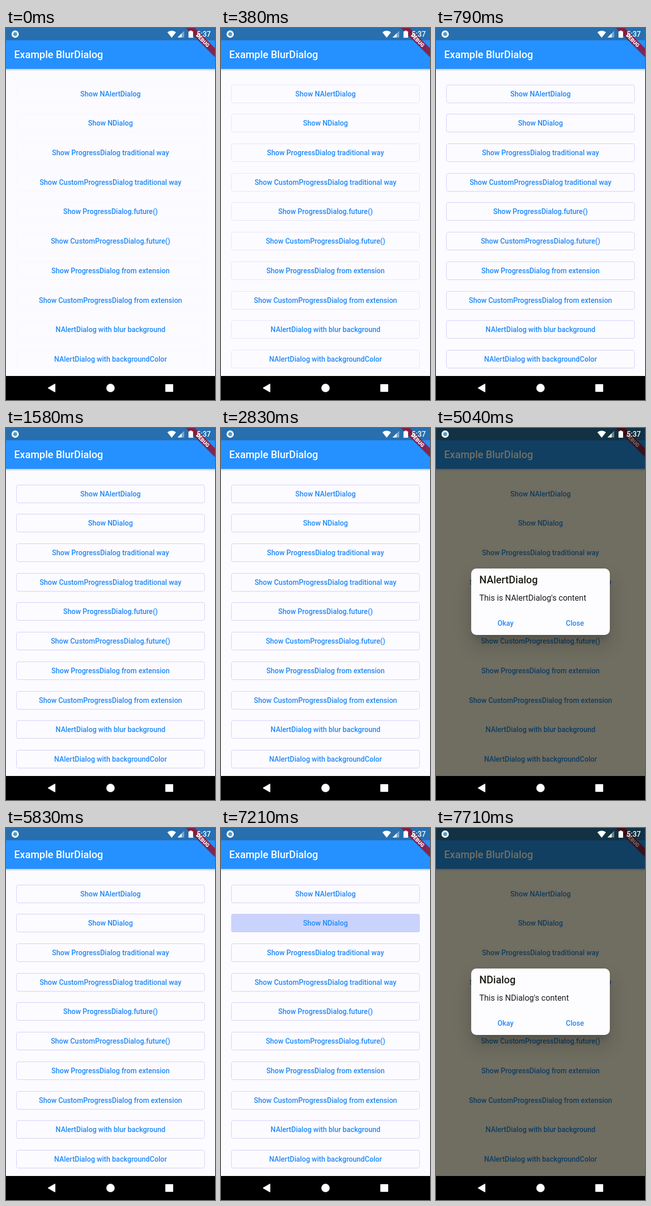
Write an HTML page that moves like this. It is 410 px wide and 728 px high and loops after 8 s.

```html
<!DOCTYPE html>
<html lang="en">
<head>
<meta charset="utf-8">
<title>Dialog demo</title>
<style>
  html, body { margin: 0; width: 100%; height: 100%; overflow: hidden; }
  body { background: #fcfbff; font-family: Roboto, "Liberation Sans", sans-serif; }
  #stage { position: relative; width: 410px; height: 728px; overflow: hidden; background: #fcfbff; isolation: isolate; }
  #stage > * { position: absolute; box-sizing: border-box; }
  .status { left: 0; top: 0; width: 410px; height: 24px; background: #276fae; }
  .appbar { left: 0; top: 24px; width: 410px; height: 56px; padding-left: 16px; background: #2590ff;
    color: #fff; font: 500 20px/57px Roboto, "Liberation Sans", sans-serif;
    box-shadow: 0 2px 3px rgba(60, 70, 120, .3); }
  .btn { left: 20px; width: 370px; height: 36px; border-radius: 4px; overflow: hidden;
    display: flex; align-items: center; justify-content: center;
    color: #2189f8; font-size: 14px; font-weight: 500; white-space: nowrap; }
  .btn * { position: absolute; box-sizing: border-box; }
  .btn span { position: relative; }
  .line { inset: 0; border: 1px solid #d3cdf9; border-radius: 4px; }
  .glow { inset: 0; background: #e0e5fe; opacity: 0; }
  .wave { left: -15px; top: -182px; width: 400px; height: 400px; border-radius: 50%; background: #c9d3fd; }
  .shade { left: 0; top: 0; width: 410px; height: 681px; background: #716f61; mix-blend-mode: multiply; opacity: 0; }
  .dialog { left: 69px; top: 275px; width: 272px; height: 130px; border-radius: 10px; background: #fdfcff; opacity: 0;
    box-shadow: 0 11px 15px -7px rgba(0, 0, 0, .2), 0 20px 34px 3px rgba(0, 0, 0, .14); }
  .dialog * { position: absolute; white-space: nowrap; margin: 0; }
  .dialog h2 { left: 16px; top: 10px; font: 500 20px/24px Roboto, "Liberation Sans", sans-serif; color: #1d1c14; }
  .dialog p { left: 16px; top: 48px; font-size: 16px; line-height: 20px; color: #1d1c1c; }
  .dialog b { top: 97px; width: 135px; text-align: center; font-size: 14px; line-height: 20px; font-weight: 500; color: #2189f8; }
  svg { left: 0; top: 0; }
  svg text { font-family: Roboto, "Liberation Sans", sans-serif; fill: #fff; }
</style>
</head>
<body>
<div id="stage">
  <div class="status"></div>
  <div class="appbar">Example BlurDialog</div>
  <svg id="banner" width="410" height="80">
    <g transform="translate(410 0) rotate(45)">
      <rect x="-40" y="28" width="80" height="12" fill="#000" opacity=".2" transform="translate(0 1)"/>
      <rect x="-40" y="28" width="80" height="12" fill="#a01030" opacity=".78"/>
      <text x="0" y="37.6" font-size="10.2" font-weight="900" text-anchor="middle">DEBUG</text>
    </g>
  </svg>
  <div class="shade"></div>
  <svg id="system" width="410" height="728" fill="#fff">
    <circle cx="18" cy="12" r="7.2" fill="#f4f9fc"/>
    <circle cx="18" cy="12" r="4" fill="#6ba9cb"/>
    <circle cx="18" cy="12" r="2" fill="#4b92bd"/>
    <path d="M316.500 8.300Q325 2 333.500 8.300L325 19Z"/>
    <path d="M336.500 18.500L349.500 5.500V18.500Z" opacity=".4"/>
    <path d="M336.500 18.500L344.500 10.500V18.500Z"/>
    <path d="M358 6.500h2.700V5h3.600v1.500H367V19h-9Z"/>
    <text x="374" y="17.200" font-size="14" font-weight="500">5:37</text>
    <rect y="681" width="410" height="47" fill="#000"/>
    <path d="M83 704.500L96 697V712Z" stroke="#fff" stroke-width="1.500" stroke-linejoin="round"/>
    <circle cx="205" cy="704.500" r="8.200"/>
    <rect x="312.500" y="697" width="15.500" height="15" rx="1"/>
  </svg>
</div>
<script>
  const LOOP = 8000;
  const stage = document.getElementById('stage');
  const banner = document.getElementById('banner');
  const system = document.getElementById('system');
  const shade = stage.querySelector('.shade');

  const labels = [
    'Show NAlertDialog',
    'Show NDialog',
    'Show ProgressDialog traditional way',
    'Show CustomProgressDialog traditional way',
    'Show ProgressDialog.future()',
    'Show CustomProgressDialog.future()',
    'Show ProgressDialog from extension',
    'Show CustomProgressDialog from extension',
    'NAlertDialog with blur background',
    'NAlertDialog with backgroundColor'
  ];

  function add(parent, className, html, before = null) {
    const el = document.createElement('div');
    el.className = className;
    el.innerHTML = html;
    parent.insertBefore(el, before);
    return el;
  }

  // Runs a table of [time, value] steps for one property over the loop.
  function play(el, prop, steps) {
    const all = [[0, steps[0][1]], ...steps, [LOOP, steps[steps.length - 1][1]]];
    const frames = all.map(([t, v]) => ({ offset: t / LOOP, [prop]: v }));
    el.animate(frames, { duration: LOOP, iterations: Infinity });
  }

  const fadeIn = t => [[t - 1, 0], [t, .25], [t + 60, .6], [t + 130, .88], [t + 220, 1]];
  const fadeOut = t => [[t - 1, 1], [t, .55], [t + 40, .2], [t + 75, 0]];
  const first = [...fadeIn(4380), ...fadeOut(5750)];
  const second = fadeIn(7420);

  function press(btn, down, open) {
    const glow = btn.querySelector('.glow');
    const wave = btn.querySelector('.wave');
    play(glow, 'opacity', [[down - 1, 0], [down + 180, 1], [open, 1], [open + 220, 0]]);
    play(wave, 'transform', [[down, 'scale(.08)'], [down + 170, 'scale(.35)'], [down + 500, 'scale(1)']]);
  }

  const buttons = labels.map((label, i) => {
    const btn = add(stage, 'btn',
      '<div class="glow"><div class="wave"></div></div><div class="line"></div><span>' + label + '</span>', banner);
    btn.style.top = 110.6 + i * 57.72 + 'px';
    const line = btn.querySelector('.line');
    const hide = [...first, ...second].map(([t, v]) => [t, 1 - v]);
    play(line, 'opacity', [[0, .08], [40, .12], [780, 1], ...hide]);
    return btn;
  });

  function dialog(name, steps) {
    const el = add(stage, 'dialog',
      `<h2>${name}</h2><p>This is ${name}'s content</p>` +
      '<b style="left:0">Okay</b><b style="left:136px">Close</b>', system);
    play(el, 'opacity', steps);
  }

  press(buttons[0], 3750, 4380);
  press(buttons[1], 6630, 7420);
  dialog('NAlertDialog', first);
  dialog('NDialog', second);
  play(shade, 'opacity', [...first, ...second]);
</script>
</body>
</html>
```
